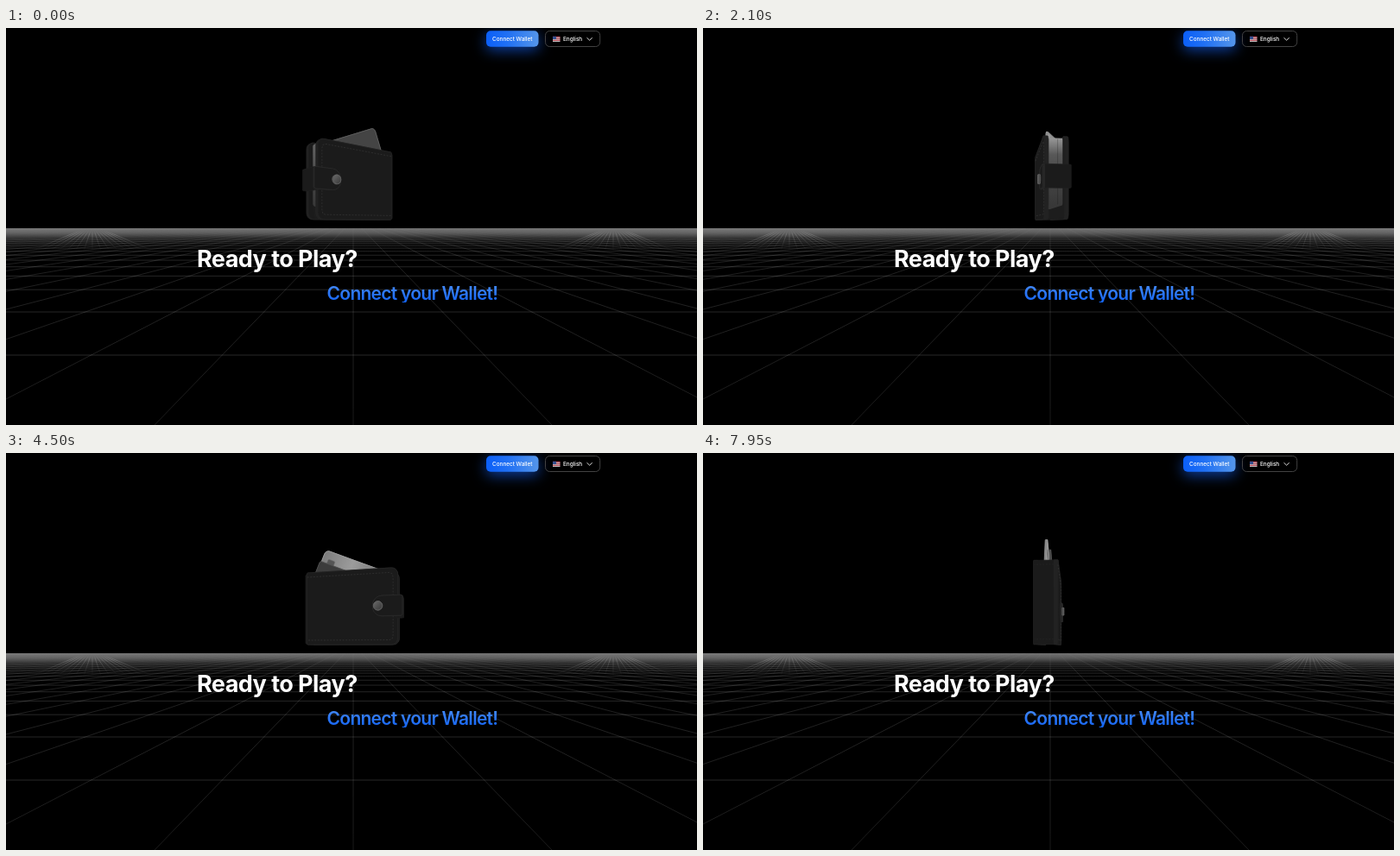
Animation, 800 px wide and 460 px high, one loop 8 s. Source, as an HTML page with a canvas:

```html
<!DOCTYPE html>
<html lang="en">
<head>
<meta charset="utf-8">
<title>Wallet</title>
<style>
  html, body { margin: 0; width: 100%; height: 100%; overflow: hidden; background: #000; }
  canvas { display: block; width: 800px; height: 460px; }
</style>
</head>
<body>
<canvas id="stage"></canvas>
<script>
const W = 800, H = 460, LOOP = 8000, STEP = 50;
const dpr = window.devicePixelRatio || 1;
const stage = document.getElementById('stage');
const back = document.createElement('canvas');
for (const c of [stage, back]) { c.width = W * dpr; c.height = H * dpr; }
const out = stage.getContext('2d');
let g = back.getContext('2d');
g.scale(dpr, dpr);
out.scale(dpr, dpr);

function ramp(x0, y0, x1, y1, ...stops) {
  const r = g.createLinearGradient(x0, y0, x1, y1);
  stops.forEach(([at, color]) => r.addColorStop(at, color));
  return r;
}

function line(x0, y0, x1, y1, style, width = 1) {
  g.strokeStyle = style;
  g.lineWidth = width;
  g.beginPath();
  g.moveTo(x0, y0);
  g.lineTo(x1, y1);
  g.stroke();
}

// ---------- static scenery ----------

function drawFloor() {
  const vx = 402, vy = 222;
  g.save();
  g.beginPath();
  g.rect(0, 232, W, H - 232);
  g.clip();

  const ray = ramp(0, 232, 0, H, [0, 'rgba(255,255,255,.1)'], [.12, 'rgba(255,255,255,.15)'],
    [.4, 'rgba(255,255,255,.16)'], [1, 'rgba(255,255,255,.13)']);
  for (let i = -55; i <= 55; i++) line(vx, vy, vx + i * 230, vy + 238, ray, .8);

  for (let i = 0; i < 30; i++) {
    const y = vy + 336 / (2.14 + i);
    line(0, y, W, y, `rgba(255,255,255,${.2 - i * .003})`, .8);
  }

  g.fillStyle = ramp(0, 232, 0, 262, [0, 'rgba(125,125,125,.85)'], [.2, 'rgba(110,110,110,.7)'],
    [.38, 'rgba(72,72,72,.4)'], [.65, 'rgba(45,45,45,.15)'], [1, 'rgba(0,0,0,0)']);
  g.fillRect(0, 232, W, 30);

  // interference fans where the distant rays bunch up
  for (const x of [100, 703]) {
    const fan = ramp(0, 235, 0, 258, [0, 'rgba(190,190,190,0)'], [.2, 'rgba(190,190,190,.28)'],
      [1, 'rgba(150,150,150,0)']);
    for (let k = -7; k <= 7; k++) line(x + k * 2.2, 235, x + k * 10, 258, fan, 1);
  }
  g.restore();
}

function text(str, x, y, size, weight, fill, spacing = 0) {
  g.font = `${weight} ${size}px Inter, "Open Sans", sans-serif`;
  g.letterSpacing = spacing + 'px';
  g.fillStyle = fill;
  g.fillText(str, x, y);
}

function box(x, y, w, h, r) {
  g.beginPath();
  g.roundRect(x, y, w, h, r);
}

function drawFlag(x, y) {
  for (let i = 0; i < 6; i++) {
    g.fillStyle = i % 2 ? '#eee' : '#d5374a';
    g.fillRect(x, y + i, 8.5, 1);
  }
  g.fillStyle = '#34508f';
  g.fillRect(x, y, 4, 3.2);
}

function drawHeader() {
  g.save();
  g.shadowColor = 'rgba(20,100,255,.62)';
  g.shadowBlur = 16 * dpr;
  g.shadowOffsetY = 4 * dpr;
  g.fillStyle = ramp(556, 0, 617, 0, [0, '#0b5ff8'], [.4, '#2070f4'], [1, '#5596ea']);
  box(556, 3.3, 60.5, 18.5, 5);
  g.fill();
  g.restore();
  text('Connect Wallet', 563, 15, 6.4, 500, '#fff');

  g.strokeStyle = '#4a4a4a';
  g.lineWidth = .9;
  box(624.5, 3.5, 63.2, 18, 5);
  g.stroke();
  drawFlag(633, 9.8);
  text('English', 645, 15, 6.4, 500, '#fff');
  g.strokeStyle = '#ddd';
  g.lineWidth = 1;
  g.beginPath();
  g.moveTo(672.5, 11.2);
  g.lineTo(675.6, 14.2);
  g.lineTo(678.7, 11.2);
  g.stroke();
}

function drawTitles() {
  text('Ready to Play?', 221, 277.3, 27, 700, '#fff', -.54);
  g.save();
  g.beginPath();
  g.rect(360, 292, 230, 26);
  g.clip();
  text('Connect your Wallet!', 371.6, 315, 21, 600,
    ramp(0, 298, 0, 318, [0, '#4389f8'], [1, '#1263f5']), -.74);
  g.restore();
}

// ---------- wallet: x runs spine to strap, h up, n through the thickness ----------

const EYE = 335, CX = 401, BASE = 224;
let sin = 0, cos = 1;

function project(x, h, n) {
  const s = EYE / (EYE - x * sin - n * cos);
  return [CX + (n * sin - x * cos) * s, BASE - h * s];
}

const at = (shape, n) => shape.map(([x, h]) => project(x, h, n));

// rounded rectangle; a is the radius at the x0 side, b at the x1 side
function plate(x0, x1, h0, h1, a, b) {
  const pts = [];
  const corner = (x, h, r, from) => {
    for (let i = 0; i <= 5; i++) {
      const q = (from + i / 5) * Math.PI / 2;
      pts.push([x + r * Math.cos(q), h + r * Math.sin(q)]);
    }
  };
  corner(x1 - b, h1 - b, b, 0);
  corner(x0 + a, h1 - a, a, 1);
  corner(x0 + a, h0 + a, a, 2);
  corner(x1 - b, h0 + b, b, 3);
  return pts;
}

function hull(points) {
  const pts = [...points].sort((p, q) => p[0] - q[0] || p[1] - q[1]);
  const half = list => {
    const res = [];
    for (const p of list) {
      while (res.length > 1) {
        const [a, b] = res.slice(-2);
        if ((b[0] - a[0]) * (p[1] - a[1]) - (b[1] - a[1]) * (p[0] - a[0]) > 0) break;
        res.pop();
      }
      res.push(p);
    }
    return res.slice(0, -1);
  };
  return [...half(pts), ...half(pts.reverse())];
}

function poly(pts, fill, stroke, width = .7, close = true) {
  g.beginPath();
  pts.forEach(p => g.lineTo(p[0], p[1]));
  if (close) g.closePath();
  if (fill) { g.fillStyle = fill; g.fill(); }
  if (stroke) { g.strokeStyle = stroke; g.lineWidth = width; g.stroke(); }
}

// extruded shape between depths n0 and n1, with its visible face on top
function slab(shape, n0, n1, side, face, edge) {
  poly(hull([...at(shape, n0), ...at(shape, n1)]), side, edge);
  const eye = EYE * cos;
  if (eye > n1) poly(at(shape, n1), face, edge);
  else if (eye < n0) poly(at(shape, n0), face, edge);
}

const COVER = plate(-51, 53, 2, 85, 1, 7);
const CORE = plate(-49, 46, 3, 77, 1, 3);
const POCKET = plate(-48, 48, 16, 83.5, 1, 3);
const FLAP = plate(26, 58, 33, 55, 10, 2);
const SNAP = plate(27.2, 36.8, 39.2, 48.8, 4.8, 4.8);

const TILT = 23 * Math.PI / 180;
// card coordinates: u along the top edge, v down the short edge
const onCard = ([u, v]) => [
  -32 + u * Math.cos(TILT) - v * Math.sin(TILT),
  114 - u * Math.sin(TILT) - v * Math.cos(TILT)
];
const CARD = plate(0, 74, 0, 44, 5, 5).map(onCard);
const CARD2 = plate(0, 66, 15, 44, 2, 2).map(onCard);
const CHIP = plate(7, 16, 9, 16, 1.5, 1.5).map(onCard);

function drawCards() {
  const a = project(-32, 114, 0), b = project(34, 86, 0);
  const light = ramp(a[0], a[1], b[0], b[1] + .1, [0, '#7c7c7c'], [.5, '#9c9c9c'], [1, '#777']);
  const main = () => {
    slab(CARD, 0, 2, '#858585', cos > 0 ? '#444' : light, cos > 0 ? '#606060' : '#a0a0a0');
    if (cos < 0) poly(at(CHIP, 0), '#555', '#6c6c6c', .5);
  };
  const second = () => slab(CARD2, -4, -3, '#4c4c4c', '#3c3c3c', '#525252');
  if (cos > 0) { second(); main(); } else { main(); second(); }
}

function drawInside() {
  slab(CORE, -9, 9, '#1d1d1d', '#1d1d1d');
  const [x, y] = project(48, 83, 0), [, y2] = project(48, 16, 0);
  const top = cos > 0 ? '#626262' : '#999';
  slab(POCKET, -7, 7, ramp(x, y, x, y2, [0, top], [.25, '#585858'], [.6, '#454545'], [1, '#383838']), '#2c2c2c');
  if (sin > .3) {
    const p = project(48, 82, 2), q = project(48, 17, 2);
    line(p[0], p[1], q[0], q[1], 'rgba(20,20,20,.3)', .8);
  }
}

function drawCover(side) {
  const n0 = side > 0 ? 8 : -12;
  slab(COVER, n0, n0 + 4, '#222', '#1b1b1b', '#262626');
  if (side * cos * EYE < 12) return;
  const n = side * 12;
  const seam = [[-51, 80], [44, 80], [47, 78.5], [48, 75], [48, 12], [47, 8], [44, 7], [-51, 7]];
  g.setLineDash([2, 1.6]);
  poly(at(seam, n), null, '#363636', .7, false);
  g.setLineDash([]);
}

function drawSpine() {
  const pts = [];
  for (const h of [2, 85]) {
    const inset = h > 50 ? -1.5 : 1;
    for (const k of [-1, 1]) {
      pts.push(project(-53.5, h + inset, k * 9), project(-53, h + inset * 2, k * 11.5), project(-50, h, k * 12));
    }
  }
  poly(hull(pts), '#1b1b1b', '#212121');
  if (sin < -.5) {
    g.setLineDash([2, 1.6]);
    for (const h of [7, 80]) {
      const a = project(-53, h, -11), b = project(-53, h, 11);
      line(a[0], a[1], b[0], b[1], '#272727', .6);
    }
    g.setLineDash([]);
  }
}

function drawBand() {
  const pts = [];
  for (const n of [-1, 1]) for (const h of [33, 55]) {
    pts.push(project(50, h, n * 14), project(56, h, n * 14), project(58, h, n * 11));
  }
  poly(hull(pts), '#1b1b1b', '#222');
}

function drawFlap(side) {
  if (Math.abs(EYE * cos) < 12) return;
  const span = (a, b) => side > 0 ? [a, b] : [-b, -a];
  slab(FLAP, ...span(12, 14), '#262626', '#1b1b1b', '#2c2c2c');
  const c = project(32, 44, side * 16);
  slab(SNAP, ...span(14, 16), '#4c4c4c',
    ramp(c[0] - 4, c[1] - 4, c[0] + 4, c[1] + 4, [0, '#666'], [.5, '#505050'], [1, '#3e3e3e']), '#646464');
}

function drawWallet(t) {
  const angle = (37 + .0288 * t) * Math.PI / 180;
  sin = Math.sin(angle);
  cos = Math.cos(angle);
  const near = cos > 0 ? 1 : -1;
  if (sin > 0) drawSpine(); else drawBand();
  drawCover(-near);
  drawCards();
  drawInside();
  if (sin < 0) drawSpine();
  drawCover(near);
  if (sin > 0) drawBand();
  drawFlap(near);
}

g.fillStyle = '#000';
g.fillRect(0, 0, W, H);
drawFloor();
drawHeader();
drawTitles();
g = out;
g.lineJoin = 'round';

const start = performance.now();
function frame() {
  const t = Math.floor((performance.now() - start) % LOOP / STEP) * STEP;
  g.drawImage(back, 0, 0, W, H);
  drawWallet(t);
  requestAnimationFrame(frame);
}
frame();
</script>
</body>
</html>
```
